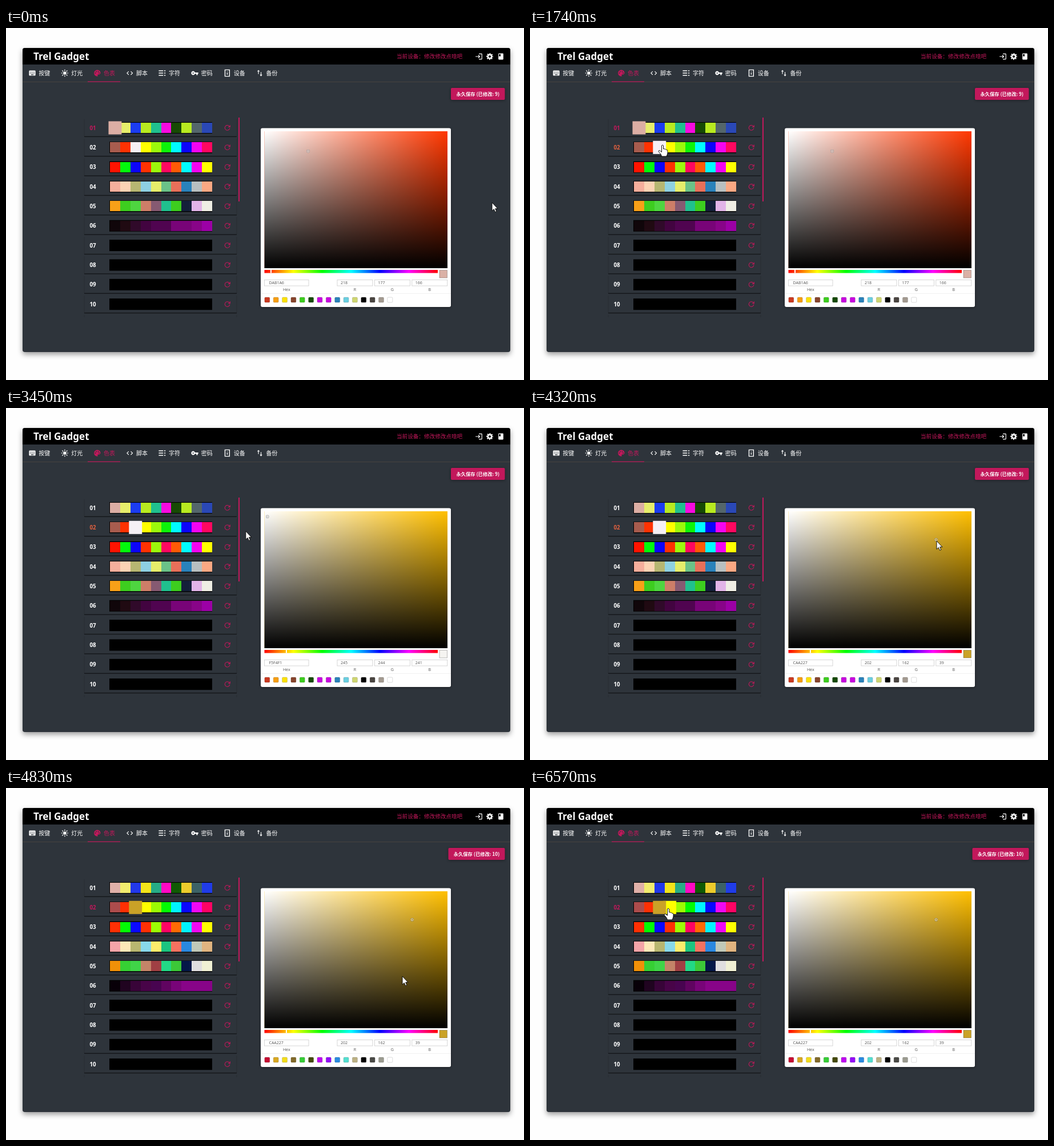
Write an HTML page that moves like this. It is 907 px wide and 617 px high and loops after 6.9 s.

```html
<!DOCTYPE html>
<html lang="zh-CN">
<head>
<meta charset="utf-8">
<title>Colour table</title>
<style>
  html, body { margin: 0; width: 100%; height: 100%; overflow: hidden; background: #fefefe; }
  svg { display: block; width: 100%; height: 100%; }
  text { font-family: 'Noto Sans CJK SC', 'Noto Sans CJK', 'Open Sans', sans-serif; }
  .heavy { font-family: Impact, 'Noto Sans', 'Open Sans', sans-serif; font-weight: 900; font-stretch: extra-condensed; }
  .field { font-family: 'Open Sans', sans-serif; font-size: 7px; fill: #555; }
  .window { filter: drop-shadow(0 4px 5px rgba(0,0,0,.4)); }
  .panel { filter: drop-shadow(0 1px 2px rgba(0,0,0,.4)); }
</style>
</head>
<body>
<svg id="stage" viewBox="0 0 907 617"></svg>
<script>
const LOOP = 6900, PINK = '#c2185b', BACK = '#2e343b';
const SELECT = 2420, PICK = 4140, BUSY = 4490, SAVED = 4830;

const run = (from, to, n) => Array.from({ length: n }, (_, i) => from + (to - from) * i / (n - 1));
const STEPS = [0, ...run(360, 1390, 7), 1570, 1740, 2420, 2600, ...run(3100, 4140, 7),
  ...run(4320, 4830, 4), ...run(5180, 6220, 7), 6390, 6570];

// Pointer moves: start, end, from, to
const MOVES = [
  [190, 1570, [851, 306], [205, 207]],
  [1570, 1740, [205, 207], [232, 205]],
  [2930, 4140, [232, 205], [712, 233]],
  [4320, 4660, [712, 233], [694, 330]],
  [5010, 6390, [694, 330], [203, 205]],
  [6390, 6570, [203, 205], [242, 211]]
];

const colours = rows => rows.map(r => r.split(' ').map(c => '#' + c));
const ROWS = colours([
  'dcaea4 e6ed6b 1b3cf0 b8ea20 20c08e f80ae0 174a04 b8ea20 54666b 2a48b6',
  'a85c4e ff3202 f5f0f5 ffff00 9cf90c 0df40a 00fbff 0c04fa f404f0 ff0860',
  'ff1400 02fa0c 0c04fa ff3202 9cf90c ff0860 ff5a06 00fbff f404f0 ffff00',
  'f6ae9c fcd3b4 b7b672 8ed0e2 e6ed6b 6bc288 e8705a 2a82ba b8bfc0 faa883',
  'f8a018 3dcd1f 4ed540 cd7e68 865a72 20c08e 3dcd1f 14203a e2b4e8 efeee4',
  '10060a 200a12 300a2a 420440 500450 500450 780478 780478 880488 9c00a6'
]);
const SAVED_ROWS = colours([
  'e0b0a8 f2ec6e 2238ea f2e41a 26ac86 ff08c4 105a04 eccc2c 3c6266 203ce8',
  'ac4c4c ff3004 caa227 ffff00 9cfc04 02fc04 00f4ff 0a08ff f008f4 ff0464',
  'ff3004 02fc04 0a08ff ff3004 9cfc04 ff0464 ff6a04 00f4ff f008f4 ffff00',
  'f4a4a8 fce8b8 b8b670 88d8ea fcec6c 1cc480 f47260 2a88e0 c0c8b8 e0b480',
  'f09008 36d034 40d448 c48468 a04044 22d886 3cc838 041848 e0dee0 f0f0d4',
  '080008 200420 380438 480448 480450 600460 780478 880488 880488 880488'
]);
const [PRESETS, SAVED_PRESETS] = colours([
  'ca3a21 f69e12 fbe108 87452d 3dcd1f 164a05 c806e0 c806e0 2a82ba 6bcfe0 cfd671 000 4a4541 a39a90 fff',
  'c60d33 d9a822 f3dd1c 826a2a 37cd37 454a0a be06f0 930cf8 2a8be0 55dfd0 bcb184 000 4a4a46 9b9b90 fff'
]);

const ICONS = {
  login: '<path d="M11 7L9.6 8.4l2.6 2.6H2v2h10.2l-2.6 2.6L11 17l5-5-5-5zm9 12h-8v2h8c1.1 0 2-.9 2-2V5c0-1.1-.9-2-2-2h-8v2h8z"/>',
  gear: '<g fill="none" stroke="currentColor"><circle cx="12" cy="12" r="5.7" stroke-width="4.4"/><circle cx="12" cy="12" r="8.8" stroke-width="3" pathLength="16" stroke-dasharray="1" stroke-dashoffset=".5"/></g>',
  book: '<path d="M18 2H6c-1.1 0-2 .9-2 2v16c0 1.1.9 2 2 2h12c1.1 0 2-.9 2-2V4c0-1.1-.9-2-2-2zM6 4h5v8l-2.5-1.5L6 12z"/>',
  keyboard: '<path fill-rule="evenodd" d="M4 4h16q2 0 2 2v12q0 2-2 2H4q-2 0-2-2V6q0-2 2-2zM5 8v2h2V8zm4 0v2h2V8zm4 0v2h2V8zm4 0v2h2V8zM5 12v2h2v-2zm4 0v2h2v-2zm4 0v2h2v-2zm4 0v2h2v-2zM8 16v2h8v-2z"/>',
  sun: '<circle cx="12" cy="12" r="5"/><path fill="none" stroke="currentColor" stroke-width="2.2" d="M12 1v4M12 19v4M1 12h4M19 12h4M4 4l3 3M17 17l3 3M4 20l3-3M17 7l3-3"/>',
  palette: `<path d="M12 2C6.500 2 2 6.500 2 12s4.500 10 10 10c1 0 1.700-.8 1.700-1.700 0-1-.8-1.300-.8-2.300s.7-1.700 1.700-1.700H17c3 0 5-2.400 5-5.300C22 6 17.500 2 12 2z"/><g fill="${BACK}"><circle cx="6" cy="12" r="1.600"/><circle cx="9" cy="7.500" r="1.600"/><circle cx="15" cy="7.500" r="1.600"/><circle cx="18" cy="12" r="1.600"/></g>`,
  code: '<path d="M9.400 16.600L4.800 12l4.600-4.600L8 6l-6 6 6 6zm5.200 0l4.600-4.600-4.600-4.600L16 6l6 6-6 6z"/>',
  lines: '<path fill="none" stroke="currentColor" stroke-width="2.500" d="M1 5h14M1 12h14M1 19h14M18 5h4M18 12h4M18 19h4"/>',
  key: '<path d="M12.650 10A6 6 0 1 0 12.650 14H17v4h4v-4h2v-4zM7 14a2 2 0 1 1 0-4 2 2 0 0 1 0 4z"/>',
  device: '<path fill="none" stroke="currentColor" stroke-width="2.500" d="M5 2h14v20H5zM12 7v2M12 11v6"/>',
  swap: '<path d="M8 2L4 7h3v8h2V7h3zm9 15v-8h-2v8h-3l4 5 4-5z"/>',
  reload: '<path fill="none" stroke="currentColor" stroke-width="2.200" d="M20 13a9 9 0 1 1-3-8l3 3M21 2v7h-7"/>'
};
const TABS = [['keyboard', '按键'], ['sun', '灯光'], ['palette', '色表'], ['code', '脚本'],
  ['lines', '字符'], ['key', '密码'], ['device', '设备'], ['swap', '备份']];

const rect = (x, y, w, h, fill, more = '') => `<rect x="${x}" y="${y}" width="${w}" height="${h}" fill="${fill}" ${more}/>`;
const text = (x, y, size, fill, str, more = '') => `<text x="${x}" y="${y}" font-size="${size}" fill="${fill}" ${more}>${str}</text>`;
const icon = (name, x, y, size, colour = '#fff') =>
  `<g transform="translate(${x - size / 2} ${y - size / 2}) scale(${size / 24})" fill="${name === 'reload' ? 'none' : colour}" color="${colour}">${ICONS[name]}</g>`;
const MIDDLE = 'text-anchor="middle"';

const rowY = i => 175 + 34.35 * i;
const CELL = 17.9, CELLS_X = 182;

function pointerAt(t) {
  let pos = MOVES[0][2];
  for (const [start, end, a, b] of MOVES) {
    if (t < start) break;
    const p = Math.min(1, (t - start) / (end - start)), k = p * p * (3 - 2 * p);
    pos = a.map((v, i) => v + (b[i] - v) * k);
  }
  return pos;
}

function hoverAt([x, y]) {
  const row = Math.round((y - 175) / 34.35);
  if (x < 137 || x > 404 || row < 0 || row > 9) return { row: -1, col: -1 };
  const col = Math.floor((x - CELLS_X) / CELL);
  const inside = col >= 0 && col < 10 && Math.abs(y - rowY(row)) < 11;
  return { row, col: inside ? col : -1 };
}

function header(t) {
  const more = t >= BUSY, left = more ? 774.5 : 779;
  return rect(29, 35, 854, 533, BACK, 'rx="4" class="window"') +
    '<path d="M29 64V39q0-4 4-4h846q4 0 4 4v25z"/>' +
    text(48, 56, 17, '#fff', 'Trel Gadget', 'class="heavy"') +
    text(684, 53.3, 9.6, PINK, '当前设备：修改修改点啥吧') +
    icon('login', 828, 50, 14) + icon('gear', 847, 50, 14) + icon('book', 866.5, 50, 13) +
    rect(29, 94, 854, 1, '#47433f') + rect(143, 93.5, 57, 1.2, PINK) +
    TABS.map(([name, label], i) => {
      const x = 46 + 56.9 * i, colour = i === 2 ? PINK : '#fff';
      return icon(name, x, 79, 13.5, colour) + text(x + 11.3, 82.8, 10, colour, label, 'font-weight="500"');
    }).join('') +
    rect(left, 105, 873.5 - left, 21, PINK, 'rx="2" class="panel"') +
    text((left + 873.5) / 2, 118.8, 8.3, '#fff', `永久保存 (已修改: ${more ? 10 : 9})`, MIDDLE + ' font-weight="700"');
}

function cell(rows, row, col, scale) {
  const w = CELL * scale, h = 18 * scale;
  return rect(CELLS_X + CELL * (col + .5) - w / 2, rowY(row) - h / 2, w, h, rows[row]?.[col] || '#000');
}

function table(t, hover) {
  const rows = t >= BUSY ? SAVED_ROWS : ROWS;
  const [selRow, selCol] = t < SELECT ? [0, 0] : [1, 2];
  const orange = '#e0603f';
  let out = rect(407, 157, 2, 147, PINK);
  for (let i = 0; i < 10; i++) {
    const y = rowY(i);
    const colour = i === selRow ? (t >= SELECT && t < BUSY ? orange : PINK) : i === hover.row ? orange : '#fff';
    out += rect(136.5, y - 15, 1, 30, '#282d33') + rect(403.5, y - 15, 1, 30, '#282d33') +
      rect(137, y + 14.7, 267, 1.4, '#14171a') +
      text(146.5, y + 3.6, 9.8, colour, String(i + 1).padStart(2, '0'), 'class="heavy"') +
      rect(181, y - 10, 180, 20, '#000') + icon('reload', 388, y, 11.5, PINK);
    if (i < 6) for (let c = 0; c < 10; c++) out += cell(rows, i, c, 1).replace('/>', 'shape-rendering="crispEdges"/>');
  }
  out += rect(136.5, 503, 1, 4, '#282d33') + rect(403.5, 503, 1, 4, '#282d33');
  if (hover.col >= 0) out += cell(rows, hover.row, hover.col, 1.28);
  return out + cell(rows, selRow, selCol, 1.28);
}

function picker(t) {
  const rgb = t < SELECT ? [218, 177, 166] : t < PICK ? [245, 244, 241] : [202, 162, 39];
  const hue = t < SELECT ? 13 : 45;
  const hex = rgb.map(v => v.toString(16).padStart(2, '0')).join('').toUpperCase();
  const max = Math.max(...rgb), sat = 1 - Math.min(...rgb) / max;
  const box = (x, w, value, label, pad) =>
    rect(x, 441.5, w, 10.5, '#fff', 'stroke="#ccc" stroke-width=".8"') +
    `<text class="field" x="${x + pad}" y="449.3">${value}</text>` +
    `<text class="field" x="${x + w / 2}" y="460.5" ${MIDDLE}>${label}</text>`;
  const field = fill => rect(452.5, 181, 320.5, 240, fill);
  return rect(446, 175.5, 333, 313.5, '#fff', 'rx="3" class="panel"') +
    field(`hsl(${hue} 100% 50%)`) + field('url(#white)') + field('url(#black)') +
    `<circle cx="${452.5 + sat * 320.5}" cy="${181 + (1 - max / 255) * 240}" r="2" fill="none" stroke="#444" stroke-width="1.6" opacity=".5"/>` +
    `<circle cx="${452.5 + sat * 320.5}" cy="${181 + (1 - max / 255) * 240}" r="2" fill="none" stroke="#fff" stroke-width=".8"/>` +
    rect(452.5, 424, 303.5, 5.5, 'url(#hue)') + rect(452 + hue / 360 * 303.5, 424, 2, 5.5, '#fff') +
    rect(759, 424.5, 13.5, 13.5, '#' + hex, 'stroke="#000" stroke-opacity=".25"') +
    box(452.5, 77.5, hex, 'Hex', 8) +
    rgb.map((v, i) => box(580 + 65.4 * i, 62, v, 'RGB'[i], 6)).join('') +
    rect(446, 465, 333, .8, '#eee') +
    (t >= BUSY ? SAVED_PRESETS : PRESETS).map((c, i) =>
      rect(452.8 + 15.36 * i, 472, 9, 9, c, 'rx="1.5" stroke="#000" stroke-opacity=".18" stroke-width=".8"')).join('');
}

function busy(t) {
  if (t < BUSY || t >= SAVED) return '';
  const p = (t - BUSY) / 170, length = 190 + 72 * p;
  return rect(29, 35, 854, 533, '#000', 'rx="4" opacity=".3"') +
    `<circle cx="456" cy="302" r="26.500" fill="none" stroke="${PINK}" stroke-width="5.500" pathLength="360"
      stroke-dasharray="${length} 360" transform="rotate(${20 + 35 * p} 456 302)"/>`;
}

function pointer([x, y], hand) {
  const shape = hand
    ? '<path d="M-1.500 1Q0-1 1.500 1V7Q3 6 4.300 7.500 5.700 7 6.600 8.500 9 8 9 10.500V14Q8.500 17 7 20H-1.500Q-4-15-4 15L-7 11.500Q-7 9-4.500 10L-1.500 12.500z"/>'.replace('Q-4-15-4 15', 'Q-2 17-4 15')
    : '<path d="M0 0V14.500L3.300 11.500 5.500 16.500 7.800 15.500 5.700 10.700H10z"/>';
  return `<g transform="translate(${x} ${y})" fill="#fff" stroke="#000" stroke-width=".9">${shape}</g>`;
}

const stops = list => list.map((c, i) => `<stop offset="${i / (list.length - 1)}" stop-color="${c}"/>`).join('');
const DEFS = `<defs>
  <linearGradient id="white"><stop stop-color="#fff"/><stop offset="1" stop-color="#fff" stop-opacity="0"/></linearGradient>
  <linearGradient id="black" x2="0" y2="1"><stop stop-opacity="0"/><stop offset="1"/></linearGradient>
  <linearGradient id="hue">${stops(['#f00', '#ff0', '#0f0', '#0ff', '#00f', '#f0f', '#f00'])}</linearGradient>
</defs>`;

const stage = document.getElementById('stage');
const started = performance.now();
let shown = -1;

function draw() {
  const now = (performance.now() - started) % LOOP;
  const t = STEPS.filter(s => s <= now + .01).pop();
  if (t !== shown) {
    const at = pointerAt(t), hover = hoverAt(at);
    stage.innerHTML = DEFS + header(t) + table(t, hover) + picker(t) + busy(t) + pointer(at, hover.col >= 0);
    shown = t;
  }
  requestAnimationFrame(draw);
}
draw();
</script>
</body>
</html>
```
